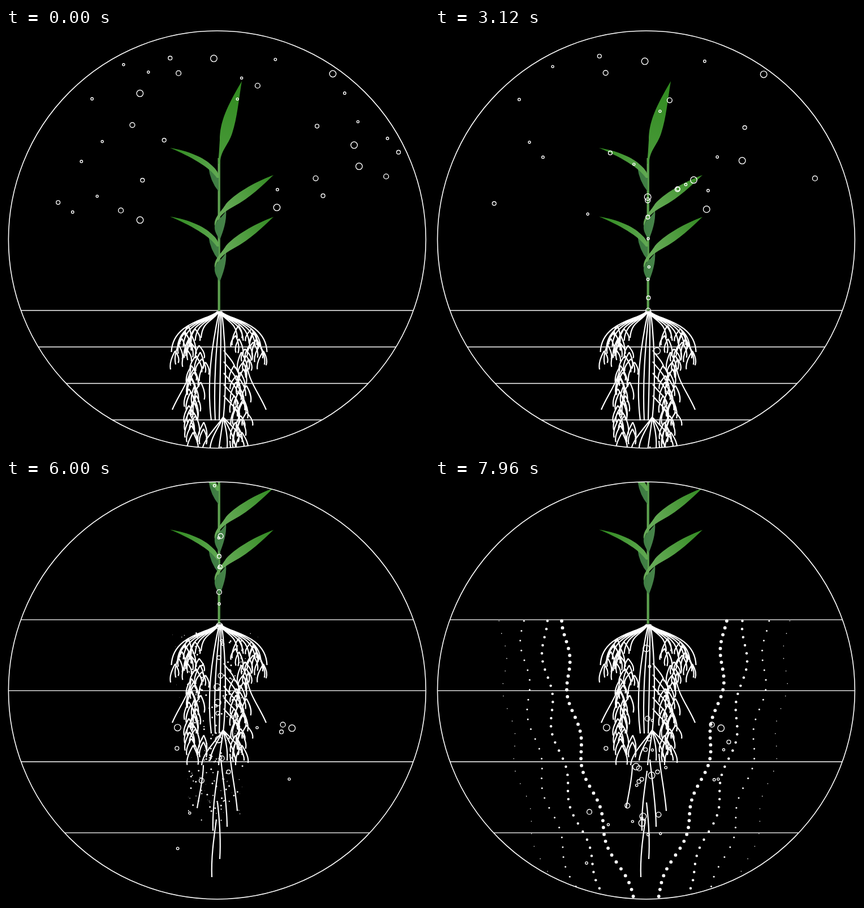
An HTML page with a canvas that plays this animation: 748 by 748 pixels, repeating every 8 s.

```html
<!DOCTYPE html>
<html lang="en">
<head>
<meta charset="utf-8">
<title>Plant cycle</title>
<style>
html, body { margin: 0; height: 100%; overflow: hidden; background: #000; }
canvas { display: block; width: 100vw; height: 100vh; }
</style>
</head>
<body>
<canvas width="748" height="748"></canvas>
<script>
const ctx = document.querySelector('canvas').getContext('2d');
const LOOP = 8000, SPEED = 0.165, RAMP = 600, SCROLL = 244;
const CX = 373.4, CY = 374, RADIUS = 369, STEM = 377, GROUND = 500;

let seed = 748374;
const rnd = () => (seed = (seed * 16807) % 2147483647) / 2147483647;
const range = (a, b) => a + (b - a) * rnd();
const clamp = v => Math.max(0, Math.min(1, v));
const mix = (a, b, k) => a + (b - a) * k;
const dist = (a, b) => Math.hypot(a[0] - b[0], a[1] - b[1]);

// Cubic-bezier easing (.4, 0, .2, 1)
function ease(u) {
  let lo = 0, hi = 1, s = 0.5;
  for (let i = 0; i < 24; i++) {
    s = (lo + hi) / 2;
    const x = 1.2 * (1 - s) * (1 - s) * s + 0.6 * (1 - s) * s * s + s ** 3;
    if (x < u) lo = s; else hi = s;
  }
  return 3 * (1 - s) * s * s + s ** 3;
}

function along(points, travelled) {
  for (let i = 1; i < points.length; i++) {
    const a = points[i - 1], b = points[i], len = dist(a, b);
    if (travelled <= len) return [mix(a[0], b[0], travelled / len), mix(a[1], b[1], travelled / len)];
    travelled -= len;
  }
  return points[points.length - 1];
}

// Bubbles float in the sky, slide down a leaf and the stem, and settle in the soil
const leaves = [
  [[400, 140], [381, 205], [STEM, 245]],
  [[290, 213], [345, 235], [376, 262]],
  [[290, 334], [345, 356], [376, 384]],
  [[473, 260], [420, 290], [380, 328]],
  [[473, 334], [420, 364], [378, 404]]
];

function skySpot(taken) {
  for (;;) {
    const p = [range(25, 722), range(15, 342)];
    const nearPlant = Math.abs(p[0] - STEM) < 95 && p[1] > 165;
    const free = taken.every(b => dist(b.home, p) > 27);
    if (!nearPlant && free && dist(p, [CX, CY]) < 360) return p;
  }
}

function floatAt(b, t) {
  const k = Math.sin(t / 870);
  return [b.home[0] + 8 * Math.cos(b.angle) * k, b.home[1] + 8 * Math.sin(b.angle) * k];
}

const bubbles = [];
for (let i = 0; i < 34; i++) {
  const b = { home: skySpot(bubbles), angle: range(0, 6.3), r: [2, 3.4, 5.8, 2.2, 4.4][i % 5] };
  b.start = 500 + i * 110;
  const from = floatAt(b, b.start);
  const leaf = leaves.reduce((a, c) => dist(a[0], from) < dist(c[0], from) ? a : c);
  let rest = [range(340, 410), range(500, 635)];
  if (i < 11) rest = i % 2 ? [range(258, 309), range(390, 680)] : [range(486, 527), range(400, 535)];
  const [x, y] = [rest[0], rest[1] + SCROLL];
  b.path = [from, ...leaf, [STEM, GROUND], [range(368, 386), 545], [mix(STEM, x, 0.3), y - 55], [x, y]];
  bubbles.push(b);
}

function bubbleAt(b, t) {
  const run = t - b.start;
  if (run <= 0) return floatAt(b, t);
  return along(b.path, SPEED * (run < RAMP ? run * run / (2 * RAMP) : run - RAMP / 2));
}

// Roots
const roots = new Path2D();

function strand(x0, y0, x1, y1, bow) {
  roots.moveTo(x0, y0);
  roots.bezierCurveTo(mix(x0, x1, 0.2) + bow, mix(y0, y1, 0.33),
    mix(x0, x1, 0.8) + bow, mix(y0, y1, 0.66), x1, y1);
}

function fork(x, y, size) {
  for (const side of [-1, 1]) {
    strand(x, y, x + side * range(4, 11), y + size * range(0.8, 1.4), side * 4);
  }
}

for (const side of [-1, 1]) {
  // arching fan below the stem
  for (let i = 0; i < 6; i++) {
    const x = STEM + side * (30 + i * 10.5);
    roots.moveTo(STEM + side * i * 0.6, GROUND + 1);
    roots.bezierCurveTo(STEM + side * 12, 520 - i, x, 518, x + side * 2, 548 + i * 5);
  }
  // outer tips, then the long hanging one
  for (let i = 0; i < 4; i++) fork(STEM + side * (60 + i * 6), 538 + i * 11, 26);
  strand(STEM + side * 50, 600, STEM + side * 83, 675 - side * 0, side * -4);
  // branching columns
  for (let i = 0; i < 33; i++) {
    const y = 526 + i * 5.9;
    fork(STEM + side * range(24, y < 570 ? 64 : 55), y, 25);
  }
}
// inner verticals and their crossings
for (let i = 0; i < 4; i++) strand(STEM + i * 1.5, GROUND + 1, 363 + i * 7, 694, i * 6 - 11);
for (let i = 0; i < 5; i++) strand(385, 570 + i * 20, 405 + i * 2, 602 + i * 21, 3);
for (let i = 0; i < 6; i++) strand(384, 688, 346 + i * 15, 750 - i % 2 * 8, i * 3 - 6);
// tap roots
strand(349, 750, 338, 826, 2);
strand(380, 740, 391, 859, 2);
strand(396, 730, 409, 831, 0);
strand(375, 760, 366, 866, -3);
strand(374, 816, 378, 916, 3);
strand(372, 846, 364, 948, -3);

// Plant
const bladeLeft = new Path2D('M290 212C322 217 350 229 364 243Q376 253 377 265L373 265C360 246 326 227 290 212Z');
const sheathLeft = new Path2D('M358 246Q370 250 376 262L376 289Q361 271 358 246Z');
const bladeRight = new Path2D('M473 260C436 274 404 294 389 311C380 326 367 335 369 350C375 335 385 325 402 316C432 300 455 277 473 260Z');
const sheathRight = new Path2D('M369 350C371 340 387 332 389 321C391 342 383 362 378 375C372 365 368 358 369 350Z');
const bladeTop = new Path2D('M417 94C391 138 378 166 378 198Q377 218 375 240L379 240C378 218 393 208 400 186C409 158 411 130 417 94Z');

function gradient(x0, y0, x1, y1, from, to) {
  const g = ctx.createLinearGradient(x0, y0, x1, y1);
  g.addColorStop(0, from);
  g.addColorStop(1, to);
  return g;
}
const leftFill = gradient(290, 212, 377, 262, '#2f8a1e', '#62aa54');
const rightFill = gradient(473, 260, 385, 325, '#338b22', '#67ab58');
const topFill = gradient(417, 94, 380, 235, '#2f8a1e', '#4a9a3a');
const stemFill = gradient(374.5, 0, 379, 0, '#72b35f', '#42873a');
const sheathFill = gradient(358, 0, 390, 0, '#3b7a40', '#47844a');

function shape(path, fill, dy = 0) {
  ctx.save();
  ctx.translate(0, dy);
  ctx.fillStyle = fill;
  ctx.fill(path);
  ctx.restore();
}

function drawPlant() {
  ctx.fillStyle = stemFill;
  ctx.fillRect(374.6, 230, 4.4, 270);
  shape(bladeTop, topFill);
  for (const dy of [0, 121.5]) {
    shape(sheathLeft, sheathFill, dy);
    shape(bladeLeft, leftFill, dy);
  }
  for (const dy of [0, 74]) {
    shape(sheathRight, sheathFill, dy);
    shape(bladeRight, rightFill, dy);
  }
  ctx.lineWidth = 2.2;
  ctx.stroke(roots);
}

// Dotted streams: four mirrored lanes that narrow towards the bottom
const dots = [];
for (const side of [-1, 1]) {
  for (let lane = 0; lane < 4; lane++) {
    const count = 41 - lane * 6, wave = range(0, 6.3);
    for (let i = 0; i < count; i++) {
      const u = i / (count - 1);
      dots.push({
        side, r: 2.9 - lane * 0.7, y: 251 + u * 487, y0: 285 + u * 290 + range(-18, 18),
        reach: 141 + lane * 37 - (118 - lane * 9) * u ** 1.9 + 6 * Math.sin(u * 23 + wave),
        inner: range(-20, 55), lag: 118 + lane * 24, sway: 7 * Math.sin(u * 31 + wave * 2) + range(-5, 5)
      });
    }
  }
}

function disc(x, y, r) {
  ctx.beginPath();
  ctx.arc(x, y, r, 0, Math.PI * 2);
}

function drawDots(t) {
  const q = clamp((t - 5900) / 2060);
  if (!q) return;
  ctx.fillStyle = '#fff';
  for (const d of dots) {
    const inner = mix(d.inner, 12, clamp(q * 1.5));
    const offset = Math.max(inner, d.reach - d.lag * (1 - q)) + d.sway * Math.sin(Math.PI * q);
    disc(371 + d.side * offset, mix(d.y0, d.y, clamp(q * 2)), d.r * clamp(0.45 + q));
    ctx.fill();
  }
}

function draw(t) {
  const p = ease(clamp((t - 4120) / 1140));
  ctx.fillStyle = '#000';
  ctx.fillRect(0, 0, 748, 748);
  ctx.strokeStyle = '#fff';

  ctx.save();
  disc(CX, CY, RADIUS);
  ctx.clip();
  ctx.lineWidth = 1.3;
  for (let i = 0; i < 4; i++) {
    const y = 499.5 - 250.7 * p + i * (64.5 + 61.1 * p);
    ctx.beginPath();
    ctx.moveTo(0, y);
    ctx.lineTo(748, y);
    ctx.stroke();
  }
  ctx.save();
  ctx.translate(0, -SCROLL * p);
  drawPlant();
  ctx.lineWidth = 1.4;
  for (const b of bubbles) {
    disc(...bubbleAt(b, t), b.r);
    ctx.stroke();
  }
  ctx.restore();
  drawDots(t);
  ctx.restore();

  ctx.lineWidth = 1.6;
  disc(CX, CY, RADIUS);
  ctx.stroke();
}

const began = performance.now();
function tick() {
  draw((performance.now() - began) % LOOP);
  requestAnimationFrame(tick);
}
tick();
</script>
</body>
</html>
```
